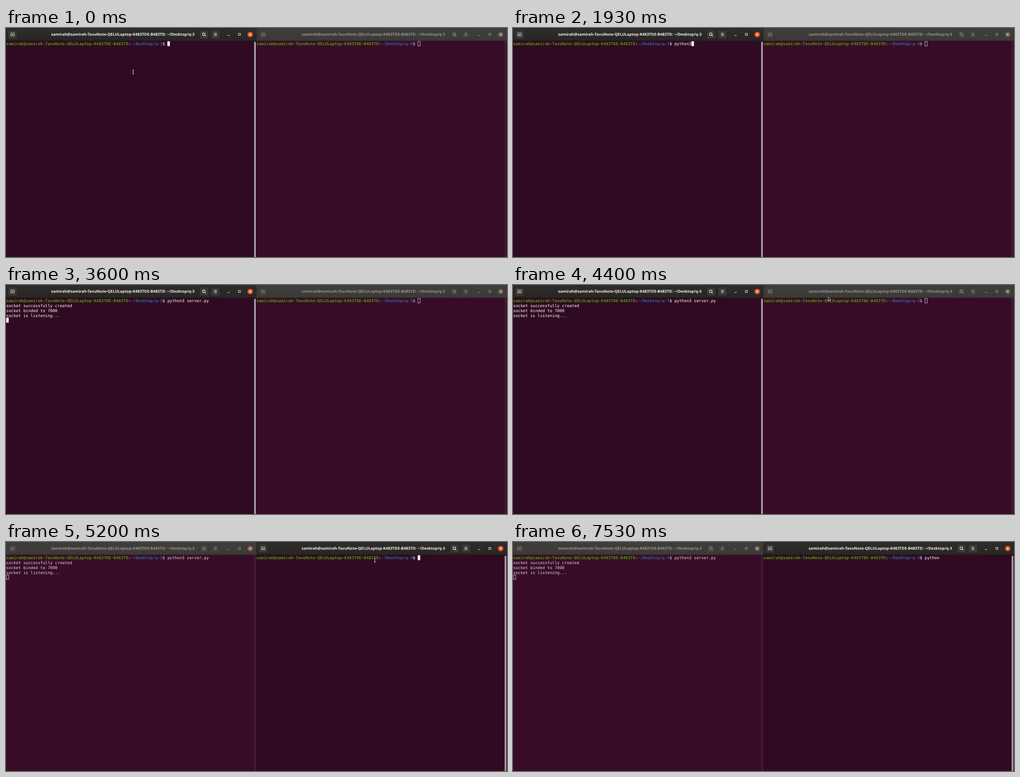
Recreate the animation shown at these times as an HTML page with a canvas. Size 1105 by 507 pixels, loop 8 s.

```html
<!DOCTYPE html>
<html lang="en">
<head>
<meta charset="utf-8">
<title>Two terminals</title>
<style>
  html, body { margin: 0; width: 100%; height: 100%; overflow: hidden; background: #300a24; }
  canvas { display: block; }
</style>
</head>
<body>
<canvas id="stage" width="1105" height="507"></canvas>
<script>
const ctx = document.getElementById('stage').getContext('2d');
const LOOP = 8000, H = 507;
const PANE = 552.5, BAR = 28.3;
const CW = 5.386, RH = 10.77, TOP = 29.4;
const MONO = '8.945px "DejaVu Sans Mono", monospace';
const TITLE = 'bold 8.6px "Open Sans", "Noto Sans", sans-serif';
const USER = 'samirah@samirah-TavuNote-QELULaptop-K483TDE-B483TD';
const DIR = '~/Desktop/q-3';
const PROMPT = USER.length + DIR.length + 3;
const COMMAND = 'python3 server.py ';
const OUTPUT = ['socket successfully created', 'socket binded to 7000', 'socket is listening...'];

// [time, characters typed so far]
const LEFT_KEYS = [[0, 0], [670, 1], [870, 2], [1130, 3], [1270, 4], [1400, 5], [1930, 7], [2400, 8], [3000, 18]];
const RIGHT_KEYS = [[0, 0], [5600, 1], [6130, 2], [6470, 3], [6600, 4], [6800, 5], [7000, 6]];
// [time, shape, x, y]
const POINTER = [[0, 'beam', 278, 92], [730, ''], [4130, 'beam', 349, 28],
  [4400, 'arrow', 695, 26], [4670, 'beam', 811, 35], [5730, '']];

// Left edge of the text grid in the pane being drawn
let gridX = 0.5;

const latest = (steps, t) => steps.filter(s => s[0] <= t).pop();
const between = (t, a, b) => t >= a && t < b;

function rect(x, y, w, h, color) {
  ctx.fillStyle = color;
  ctx.fillRect(x, y, w, h);
}

function roundRect(x, y, w, h, r, fill, stroke) {
  ctx.beginPath();
  ctx.roundRect(x, y, w, h, r);
  ctx.fillStyle = fill;
  ctx.fill();
  if (stroke) {
    ctx.strokeStyle = stroke;
    ctx.lineWidth = 0.8;
    ctx.stroke();
  }
}

function lines(color, width, ...paths) {
  ctx.strokeStyle = color;
  ctx.lineWidth = width;
  ctx.beginPath();
  for (const [x, y, ...rest] of paths) {
    ctx.moveTo(x, y);
    for (let i = 0; i < rest.length; i += 2) ctx.lineTo(rest[i], rest[i + 1]);
  }
  ctx.stroke();
}

function text(str, col, row, color, bold) {
  ctx.font = (bold ? 'bold ' : '') + MONO;
  ctx.textAlign = 'left';
  ctx.fillStyle = color;
  ctx.fillText(str, gridX + col * CW, TOP + row * RH + 8.9);
}

function cursor(col, row, color, filled) {
  const x = gridX + col * CW, y = TOP + row * RH;
  if (filled) return rect(x, y, CW, RH, color);
  ctx.strokeStyle = color;
  ctx.lineWidth = 0.9;
  ctx.strokeRect(x + 0.45, y + 0.45, CW - 0.3, RH - 0.9);
}

function header(active, closeColor) {
  const shade = ctx.createLinearGradient(0, 0, 0, BAR);
  shade.addColorStop(0, active ? '#2e2d2a' : '#3f3e3a');
  shade.addColorStop(1, active ? '#272623' : '#3b3a36');
  rect(0, 0, PANE, BAR, shade);
  rect(0, BAR - 0.7, PANE, 0.7, active ? '#1e1b1b' : '#302c2c');

  const ink = active ? '#f2f1ef' : '#969490';
  const fill = active ? '#393835' : '#403f3b';
  const edge = active ? '#211f1d' : '#34332f';
  for (const x of [4.5, 427, 452]) roundRect(x, 4.8, 19.8, 19.4, 2.5, fill, edge);

  // New tab
  lines(ink, 0.9, [12.6, 17.9, 10.7, 17.9, 10.7, 11.1, 18.3, 11.1, 18.3, 17.9, 16.4, 17.9],
    [14.5, 13, 14.5, 18], [12, 15.5, 17, 15.5]);

  // Search
  lines(ink, 1.2, [438.3, 16, 440.6, 18.3]);
  ctx.beginPath();
  ctx.arc(436.2, 13.8, 2.9, 0, 7);
  ctx.stroke();

  // Menu
  lines(ink, 1, ...[11.7, 14.3, 16.9].map(y => [458.7, y, 465.2, y]));

  // Minimise, maximise, close
  lines(ink, 1, [488.4, 16.5, 493.4, 16.5]);
  ctx.strokeRect(512.5, 12, 4.4, 4.4);
  ctx.beginPath();
  ctx.arc(538.6, 14.4, 6, 0, 7);
  ctx.fillStyle = closeColor;
  ctx.fill();
  lines(active ? '#fff' : '#dddbd8', 1.1, [536.4, 12.2, 540.8, 16.6], [540.8, 12.2, 536.4, 16.6]);

  ctx.font = TITLE;
  ctx.textAlign = 'center';
  ctx.fillStyle = ink;
  ctx.fillText(`${USER}: ${DIR}`, 257.7, 17.4);
}

function body(active) {
  rect(0, 28, PANE, H - 28, active ? '#300a22' : '#380c28');
  if (active) roundRect(547.3, 30.3, 3.7, H, 1.8, '#aaa4a7');
  else rect(547, 28, 4.5, H - 28, '#431934');
}

function prompt(ink, typed) {
  text(USER, 0, 0, '#4e9a06', true);
  text(':', USER.length, 0, ink);
  text(DIR, USER.length + 1, 0, '#3465a4', true);
  text('$', PROMPT - 2, 0, ink);
  text(typed, PROMPT, 0, ink);
}

function leftPane(t) {
  const active = t < 4930, ink = active ? '#fff' : '#ddd6da';
  const count = latest(LEFT_KEYS, t)[1];
  gridX = 0.5;
  body(active);
  header(t < 5200, t < 5200 ? '#e95420' : t < 5400 ? '#955a40' : '#5f5d59');
  prompt(ink, COMMAND.slice(0, count));
  if (t >= 3600) OUTPUT.forEach((line, i) => text(line, 0, i + 1, ink));

  const blinkOff = between(t, 130, 670) || between(t, 3930, 4670);
  if (blinkOff) return;
  if (t < 3400) cursor(PROMPT + count, 0, ink, true);
  else cursor(0, t < 3600 ? 1 : 4, ink, active);
}

function rightPane(t) {
  const active = t >= 5200, ink = active ? '#fff' : '#d3cbd0';
  const count = latest(RIGHT_KEYS, t)[1];
  gridX = 0.1;
  body(active);
  header(active, active ? '#e95420' : '#5f5d59');
  prompt(ink, 'python'.slice(0, count));
  if (t < 7530) cursor(PROMPT + count, 0, ink, t >= 4930);
}

function beam(x, y) {
  const shape = [[x + 0.8, y + 1, x + 4.2, y + 1], [x + 2.5, y + 1, x + 2.5, y + 9.5],
    [x + 0.8, y + 9.5, x + 4.2, y + 9.5]];
  lines('#15080f', 2.2, ...shape);
  lines('#f4f2f3', 1, ...shape);
}

function arrow(x, y) {
  ctx.beginPath();
  [0.5, 0.6, 0.5, 8.7, 2.4, 7, 3.7, 10, 5, 9.4, 3.8, 6.6, 6.3, 6.4]
    .forEach((v, i, p) => { if (i % 2) ctx.lineTo(x + p[i - 1], y + v); });
  ctx.closePath();
  ctx.fillStyle = '#111';
  ctx.fill();
  ctx.strokeStyle = '#eee';
  ctx.lineWidth = 0.8;
  ctx.stroke();
}

function draw(t) {
  leftPane(t);
  ctx.save();
  ctx.translate(PANE, 0);
  rightPane(t);
  ctx.restore();
  rect(PANE - 0.9, 0, 0.9, BAR, '#2b2a27');

  const [, shape, x, y] = latest(POINTER, t);
  if (shape === 'beam') beam(x, y);
  if (shape === 'arrow') arrow(x, y);
}

ctx.textRendering = 'geometricPrecision';
const start = performance.now();
function tick() {
  draw((performance.now() - start) % LOOP);
  requestAnimationFrame(tick);
}
tick();
</script>
</body>
</html>
```
